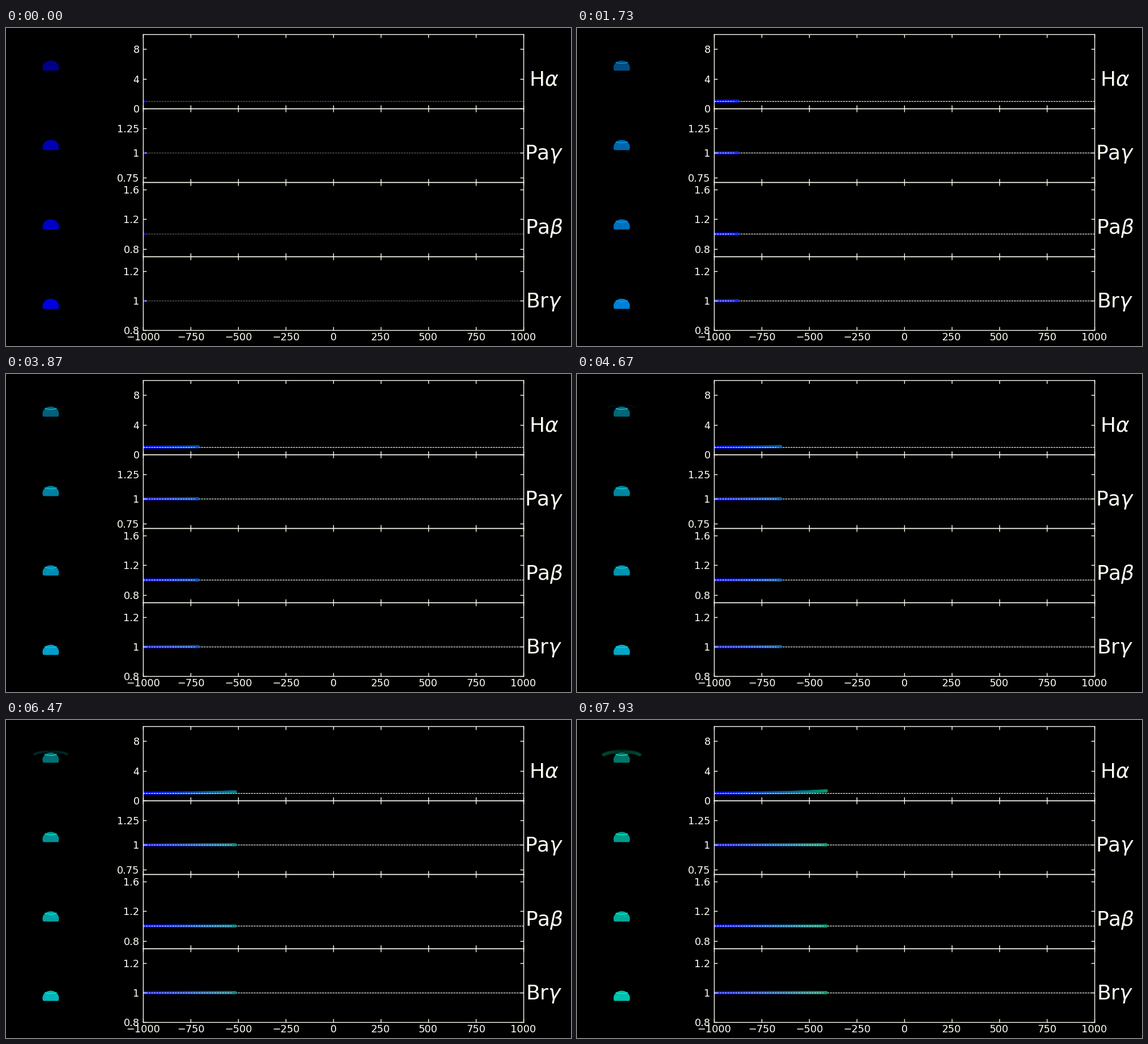
Animation, 998 px wide and 561 px high, one loop 8 s. Source, as a matplotlib script:

```python
import numpy as np
import matplotlib.pyplot as plt
from matplotlib.animation import FuncAnimation
from matplotlib.collections import LineCollection

W, H, DPI = 998, 561, 100
PX = 72 / DPI                     # points per pixel
FRAMES, LOOP_MS = 120, 8000
LEFT, RIGHT, TOP, PANEL = 242, 914, 11.4, 130.4
STAR_X, FADE = 79, 0.6
INK = "#fffff5"

# label, y range, y ticks, star brightness
PANELS = [
    (r"H$\alpha$", (0, 10), (0, 4, 8), 0.53),
    (r"Pa$\gamma$", (0.7, 1.45), (0.75, 1, 1.25), 0.70),
    (r"Pa$\beta$", (0.7, 1.7), (0.8, 1.2, 1.6), 0.77),
    (r"Br$\gamma$", (0.8, 1.3), (0.8, 1, 1.2), 0.87),
]

plt.rcParams["font.family"] = "DejaVu Sans"
plt.rcParams["mathtext.fontset"] = "dejavusans"

fig = plt.figure(figsize=(W / DPI, H / DPI), dpi=DPI, facecolor="black")
stage = fig.add_axes([0, 0, 1, 1])
stage.set(xlim=(0, W), ylim=(H, 0))
stage.axis("off")

steps = np.arange(FRAMES)
speed = -1000 + 5 * steps
hue = steps / 200
dot_rgb = np.column_stack([0 * hue, hue, 1 - hue])


def flux(row):
    rise = 0.3 if row == 0 else 0
    return 1 + rise * (steps / (FRAMES - 1)) ** 3.2


def make_panel(row):
    label, ylim, ticks, _ = PANELS[row]
    y0 = H - TOP - PANEL * (row + 1)
    ax = fig.add_axes([LEFT / W, y0 / H, (RIGHT - LEFT) / W, PANEL / H])
    ax.patch.set_visible(False)
    ax.set(xlim=(-1000, 1000), ylim=ylim)
    ax.set_xticks(range(-1000, 1001, 250))
    ax.set_yticks(ticks, [f"{v:g}" for v in ticks])
    ax.tick_params(direction="in", top=True, right=True, color=INK,
                   labelcolor=INK, labelsize=17.8 * PX, length=6 * PX,
                   width=1.4 * PX, pad=6.3 * PX, labelbottom=row == 3)
    ax.tick_params(axis="x", pad=3.8 * PX)
    for spine in ax.spines.values():
        spine.set(color=INK, linewidth=1.4 * PX)
    dot = dict(s=(5.6 * PX) ** 2, linewidths=0)
    trail = ax.scatter([], [], zorder=1, **dot)
    head = ax.scatter([], [], zorder=2.1, **dot)
    level = ax.axhline(1, color=INK, lw=1.2 * PX, ls=(0, (2.8, 1.07)),
                       zorder=2)
    stage.text(950.5, 101.7 + PANEL * row, label, color=INK,
               fontsize=36 * PX, ha="center", va="baseline")
    return trail, head, level


def make_star(row):
    y = 70.3 + 140.1 * row
    a = np.linspace(0, np.pi, 40)
    x = STAR_X + 14.5 * np.cos(a)
    xs = np.r_[x, STAR_X - 14, STAR_X - 12.5, STAR_X + 12.5, STAR_X + 14]
    ys = np.r_[y - 13 * np.sin(a), y + 4, y + 5, y + 5, y + 4]
    body, = stage.fill(xs, ys, lw=0, zorder=3)
    band, = stage.plot(STAR_X + 10 * np.cos(a), y - 10 + 2 * np.sin(a),
                       lw=1.2 * PX, zorder=4)
    return body, band


panels = [make_panel(r) for r in range(4)]
stars = [make_star(r) for r in range(4)]
rings = [LineCollection([], zorder=2) for _ in range(3)]
for ring in rings:
    stage.add_collection(ring)


def draw_ring(n):
    grow = np.clip((n - 42) / 77, 0, 1)
    reach = 20.5 + 13 * grow
    rise = 2.5 + 5.5 * grow
    a = np.linspace(0.1, np.pi - 0.1, 60)
    x = STAR_X + reach * np.cos(a)
    y = 55.4 + rise * (1 - np.sin(a)) + 0.4 * grow
    pts = np.column_stack([x, y])
    segs = np.stack([pts[:-1], pts[1:]], axis=1)
    glow = 0.6 + 0.4 * np.abs(np.cos((a[:-1] + a[1:]) / 2))
    tint = np.array([0, hue[n], 1 - hue[n]])
    for ring, wide, part in zip(rings, (1, 0.7, 0.4), (0.6, 0.82, 1)):
        ring.set_segments(segs if n > 42 else [])
        ring.set_linewidth((1.5 + 5.5 * grow ** 1.5) * wide * PX)
        ring.set_color(np.outer(glow, tint) * part * 0.55 * grow)


def draw(n):
    n = int(n)
    green, blue = hue[n] ** 0.27, (1 - hue[n]) ** 0.27
    recent = slice(max(0, n - 9), n + 1)
    # the level line gains opacity with each step, also over older dots
    cover = FADE ** (n - steps[recent] + 1)
    for row, (trail, head, level) in enumerate(panels):
        pts = np.column_stack([speed, flux(row)])
        trail.set_offsets(pts[:n + 1])
        trail.set_facecolor(dot_rgb[:n + 1])
        head.set_offsets(pts[recent])
        head.set_facecolor(np.column_stack([dot_rgb[recent], cover]))
        level.set_alpha(1 - FADE ** (n + 1))
        power = PANELS[row][3]
        body, band = stars[row]
        body.set_facecolor((0, power * green, power * blue))
        band.set_color((0, min(1, 1.15 * green), blue))
        band.set_alpha(min(1, 0.1 + n / 15))
    draw_ring(n)
    return []


anim = FuncAnimation(fig, draw, frames=FRAMES, interval=LOOP_MS / FRAMES,
                     repeat=True, repeat_delay=0, blit=False)
plt.show()
```
